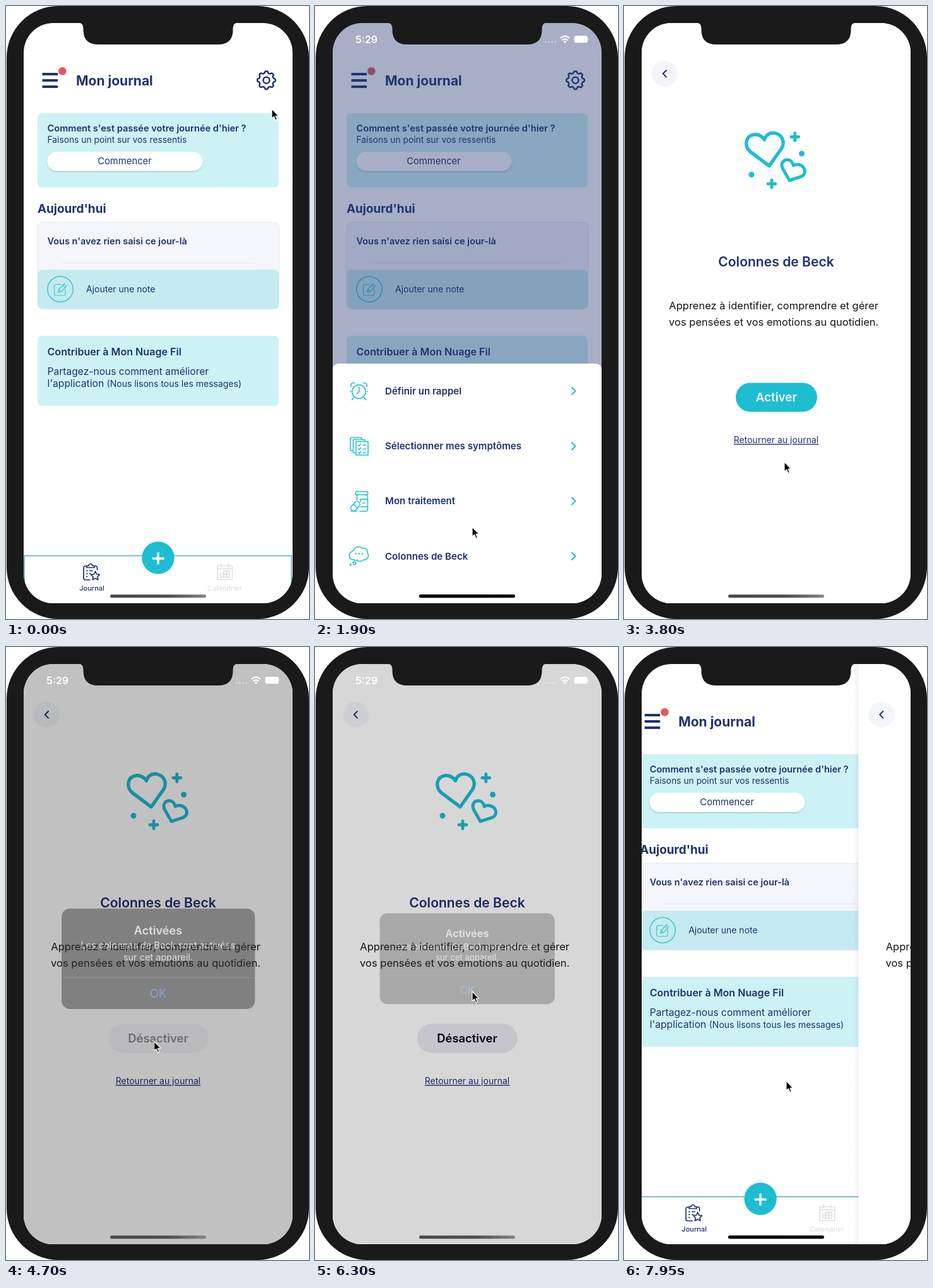
Recreate the animation shown at these times as an HTML page. Size 480 by 972 pixels, loop 8 s.

```html
<!DOCTYPE html>
<html lang="fr">
<head>
<meta charset="utf-8">
<title>Mon journal</title>
<style>
:root {
  --navy: #1f3270;
  --teal: #1fbdd0;
  --ice: #cdf2f5;
  /* critically damped spring over 520 ms */
  --spring: linear(0, .0605 4.17%, .188 8.33%, .334 12.5%, .469 16.67%, .686 25%, .824 33.3%, .905 41.67%, .95 50%, .974 58.3%, .987 66.7%, .9935 75%, .997 83.3%, 1);
}
html, body { margin: 0; width: 100%; height: 100%; overflow: hidden; background: #fff; }
svg { display: block; width: 480px; height: 972px; }
text { font-family: Inter, Roboto, sans-serif; font-optical-sizing: none; fill: var(--navy); }
.b { font-weight: 600; }
.mid { text-anchor: middle; }
.line { fill: none; stroke: var(--navy); stroke-linecap: round; stroke-linejoin: round; }
.cyan { stroke: var(--teal); }

.journal, .modal, .page, .dim, .alert, .black { animation: 8s infinite var(--spring); }
.journal { animation-name: journal; }
.modal { animation-name: modal; }
.page { animation-name: page; }
.dim { animation-name: dim; }
.alert { animation-name: alert; transform-origin: 241px 494.3px; }
.black { animation-name: black; }
.on { animation: on 8s infinite linear; }
.off { animation: off 8s infinite linear; }
.back { animation: back 8s infinite linear; }
.cursor { animation: cursor 8s infinite ease-in-out; }

/* the loop cuts the last slide short, so it runs only the start of the spring */
@keyframes journal {
  0%, 34.825% { transform: none; }
  41.325% { transform: translateX(-128px); }
  97.29% {
    transform: translateX(-128px);
    animation-timing-function: linear(0, .0605 10%, .188 20%, .334 30%, .469 40%, .686 60%, .824 80%, .905);
  }
  100% { transform: translateX(0); }
}
@keyframes page {
  0%, 34.825% { transform: translateX(426px); visibility: hidden; }
  41.325% { transform: translateX(0); visibility: visible; }
  97.29% {
    transform: translateX(0);
    visibility: visible;
    animation-timing-function: linear(0, .0605 10%, .188 20%, .334 30%, .469 40%, .686 60%, .824 80%, .905);
  }
  100% { transform: translateX(426px); visibility: visible; }
}
@keyframes modal {
  0%, 10.625% { transform: translateY(920px); }
  17.125%, 34.825% { transform: none; }
  41.325%, 100% { transform: translateY(920px); }
}
@keyframes dim {
  0%, 57.675% { opacity: 0; }
  64.175%, 77.075% { opacity: .52; }
  83.575%, 100% { opacity: 0; }
}
@keyframes alert {
  0%, 57.675% { opacity: 0; transform: scale(1.2); }
  64.175%, 77.075% { opacity: 1; transform: none; }
  83.575%, 100% { opacity: 0; transform: none; }
}
@keyframes black {
  0%, 10.625% { opacity: 0; }
  17.125%, 41.875% { opacity: 1; }
  48.375%, 96.25% { opacity: 0; }
  98.5%, 100% { opacity: 1; }
}
@keyframes on {
  0%, 55.5% { opacity: 1; }
  55.6%, 57.95% { opacity: .25; }
  58%, 100% { opacity: 0; }
}
@keyframes off {
  0%, 57.95% { opacity: 0; }
  58% { opacity: .28; }
  61.25%, 100% { opacity: 1; }
}
@keyframes back {
  0%, 96.2% { opacity: 1; }
  96.25%, 98% { opacity: .3; }
  100% { opacity: 1; }
}
@keyframes cursor {
  0% { transform: translate(421px, 163px); animation-timing-function: step-end; }
  6.25% { transform: translate(425px, 127px); animation-timing-function: step-end; }
  8.125%, 14% { transform: translate(406px, 120px); }
  21.5%, 24.5% { transform: translate(249px, 826px); }
  29.5%, 42% { transform: translate(226px, 869px); }
  51.8% { transform: translate(272px, 628px); animation-timing-function: linear; }
  52.5%, 61% { transform: translate(234.5px, 625px); }
  67.5%, 79.5% { transform: translate(249px, 546px); }
  89.3% { transform: translate(288px, 687px); }
  91.25%, 100% { transform: translate(257px, 688px); }
}
</style>
</head>
<body>
<svg viewBox="0 0 480 972">
  <defs>
    <clipPath id="screen"><rect x="28" y="27" width="426" height="920" rx="47"/></clipPath>
    <linearGradient id="bar"><stop stop-color="#484848"/><stop offset=".6" stop-color="#4c4c4c"/><stop offset="1" stop-color="#858585"/></linearGradient>
    <linearGradient id="edge"><stop stop-color="#203070" stop-opacity="0"/><stop offset="1" stop-color="#203070" stop-opacity=".07"/></linearGradient>
    <filter id="soft" x="-10%" y="-30%" width="120%" height="170%"><feDropShadow dx="0" dy="1.5" stdDeviation="1.3" flood-color="#355" flood-opacity=".28"/></filter>
    <path id="chevron" class="line cyan" stroke-width="2" d="M407 -5.5L412.5 0L407 5.5"/>
  </defs>

  <rect x="1" width="479" height="972" rx="82" fill="#1a1a1a"/>

  <g clip-path="url(#screen)">
    <rect x="28" y="27" width="426" height="920" fill="#fff"/>

    <g class="journal">
      <path class="line" stroke-width="3.8" style="stroke-linecap:butt" d="M57.5 108H82M57.5 118H82M57.5 128H82"/>
      <circle cx="89.3" cy="103.3" r="6.3" fill="#df5b62"/>
      <text x="111" y="125.5" font-size="21" font-weight="700">Mon journal</text>
      <g transform="translate(412.5 117.7)" class="line" stroke-width="2.5">
        <path id="gear"/><circle r="5"/>
      </g>

      <rect x="50" y="170" width="382" height="117.5" rx="7" fill="var(--ice)"/>
      <text class="b" x="65.5" y="199.2" font-size="14.6">Comment s'est passée votre journée d'hier ?</text>
      <text x="65.5" y="217" font-size="13.8">Faisons un point sur vos ressentis</text>
      <rect x="65.5" y="231" width="246" height="30.5" rx="15.2" fill="#fff" filter="url(#soft)"/>
      <text class="mid" x="188" y="251.3" font-size="14.8">Commencer</text>

      <text x="50" y="327.8" font-size="18.9" font-weight="700">Aujourd'hui</text>
      <rect x="50" y="343" width="382.5" height="137.5" rx="8" fill="#f5f6fb" stroke="#e3e5ee"/>
      <text class="b" x="65.5" y="378" font-size="14.5">Vous n'avez rien saisi ce jour-là</text>
      <path stroke="#e9eaf0" d="M88 407.5H395"/>
      <rect x="50" y="418.3" width="382.5" height="62" rx="8" fill="#c5eaef"/>
      <g class="line cyan" stroke-width="1.2">
        <circle cx="86" cy="449" r="20.2"/>
        <path opacity=".8" d="M87 441.5H79.5Q76.5 441.5 76.5 444.5V456Q76.5 459 79.5 459H91Q94 459 94 456V449M83.5 449.5L92 440.5L95.8 444.3L87.3 453L82.5 454ZM89.8 442.8L93.6 446.6M83.5 449.5L87.3 453"/>
      </g>
      <text x="127" y="454" font-size="14">Ajouter une note</text>

      <rect x="50" y="523" width="382" height="111" rx="7" fill="var(--ice)"/>
      <text class="b" x="65.5" y="554.3" font-size="16.1">Contribuer à Mon Nuage Fil</text>
      <text x="65.5" y="584.6" font-size="15.6">Partagez-nous comment améliorer</text>
      <text x="65.5" y="604.4" font-size="15.7">l'application <tspan font-size="14">(Nous lisons tous les messages)</tspan></text>

      <rect x="29.2" y="871.7" width="423" height="90" fill="#fff" stroke="#45a9bf" stroke-width="1.4"/>
      <circle cx="241" cy="875" r="25.7" fill="var(--teal)"/>
      <path stroke="#fff" stroke-width="3.4" d="M231.5 876H250.5M241 866.5V885.5"/>
      <g class="line" stroke-width="1.7">
        <path d="M133 910H126Q123 910 123 907V891Q123 888 126 888H128M140 888H142Q144.5 888 144.5 891V894M128 890.5V887.5H131Q131.5 884.5 134 884.5T137 887.5H140V890.5ZM127.5 895.5H129M132.5 895.5H137M127.5 900H129M127.5 904.5H129M132.5 900H134"/>
        <path fill="#fff" d="M141.5 896.5L143.6 901L148.4 901.6L144.9 905L145.8 909.8L141.5 907.5L137.2 909.8L138.1 905L134.6 901.6L139.4 901Z"/>
      </g>
      <path class="line" style="stroke:#dfdfe4" stroke-width="1.6" d="M335 887.5H358.5V909.5H335ZM335 892.5H358.5M341 884.5V889.5M352.5 884.5V889.5M339.5 905.5V900.5H344.5V896H354V905.5ZM344.5 900.5V905.5M349.2 896V905.5M344.5 900.5H354"/>
      <g class="mid" font-size="11" font-weight="500">
        <text x="136" y="927.3">Journal</text>
        <text x="346.5" y="927.3" style="fill:#dfdfe4">Calendrier</text>
      </g>
    </g>

    <g class="page">
      <rect x="20" y="27" width="8" height="920" fill="url(#edge)"/>
      <rect x="28" y="27" width="427" height="920" fill="#fff"/>
      <circle cx="64.5" cy="107.3" r="20.5" fill="#f4f5fb"/>
      <path class="line" stroke-width="2" d="M67 102L61.8 107.3L67 112.6"/>
      <g class="line cyan" stroke-width="5.4">
        <path d="M230 253.5L200 231C190 222 192 206 206 203.8C214 203 219 207 222.5 212C224.5 205 230 200.5 238 201.3C250 203 256 215 249.5 226Z"/>
        <path stroke-width="5" d="M262 276.5L251.5 258C248 251 251 245 257 244C263 243 267 247 268.3 253C273 250 280 251 284 255.5C289 262 286 269 279 271Z"/>
        <path stroke-width="4.8" d="M270.8 201.5V213.5M264.8 207.5H276.8M234 276V288M228 282H240"/>
      </g>
      <g fill="var(--teal)"><circle cx="281.5" cy="234" r="4.5"/><circle cx="202" cy="267.5" r="4.5"/></g>
      <text class="b mid" x="241" y="413" font-size="21.1">Colonnes de Beck</text>
      <g class="mid" font-size="16.5" style="--navy:#161616">
        <text x="237.2" y="481">Apprenez à identifier, comprendre et gérer</text>
        <text x="237.2" y="506.6">vos pensées et vos emotions au quotidien.</text>
      </g>
      <g class="on">
        <rect x="177" y="597.5" width="129" height="46" rx="23" fill="var(--teal)"/>
        <text class="b mid" x="241.3" y="627.2" font-size="18.8" style="fill:#fff">Activer</text>
      </g>
      <g class="off">
        <rect x="162" y="597.5" width="158.5" height="46" rx="23" fill="#e9eaf0"/>
        <text class="b mid" x="241" y="627.2" font-size="18.4" style="fill:#000">Désactiver</text>
      </g>
      <text class="mid back" x="241" y="693.3" font-size="14" text-decoration="underline">Retourner au journal</text>
    </g>

    <g class="modal">
      <rect x="28" y="27" width="426" height="920" fill="rgb(37,53,112)" fill-opacity=".4"/>
      <path fill="#fff" d="M28 947V577Q28 567 38 567H444Q454 567 454 577V947Z"/>
      <g class="line cyan" stroke-width="1.5">
        <circle cx="69.5" cy="611.5" r="10.8"/>
        <path d="M70 604.5V612L66 615.5M57 604Q55.5 597 63 597.5M82 604Q83.5 597 76 597.5M61 621L58.5 624.5M78 621L80.5 624.5M55.5 611H56.5M82.5 611H83.5"/>
        <path d="M65 690.5H84V712H65ZM65 708.5H60.5V687.5H79V690.5M60.5 705H56V684.5H74V687.5M68.5 696L70 697.5L72.5 694.5M68.5 702L70 703.5L72.5 700.5M68.5 708L70 709.5L72.5 706.5M76 696.5H80.5M76 702.5H80.5M76 708.5H80.5"/>
        <path d="M64.5 770H83.5V775H64.5ZM66.5 775V783M81.5 775Q83.5 777 83.5 780V798Q83.5 801 80.5 801H71M72 782H83.5M72 794H83.5M72 782V786M75.5 788H79"/>
        <rect x="-8.5" y="-4.5" width="17" height="9" rx="4.5" transform="translate(64 793) rotate(-48)"/>
        <path d="M61 790L67 796M57 801H66"/>
        <path d="M60.5 878C52.5 877 52.5 866 60 864.5C62 857.5 71 855.5 75.5 860C81 859 84 863.5 83 867C86.5 872 83 879.5 77 878C73 881.5 68.5 881 66.5 878.5Q63.5 879.5 60.5 878Z"/>
        <circle cx="62.5" cy="883.5" r="2.3"/><circle cx="56.3" cy="886" r="1"/>
        <path stroke-width="2.4" d="M64.5 868.5H64.6M69.7 868.5H69.8M75 868.5H75.1"/>
      </g>
      <g class="b" font-size="15.1">
        <text x="111" y="615.7">Définir un rappel</text>
        <text x="111" y="703">Sélectionner mes symptômes</text>
        <text x="111" y="790.4">Mon traitement</text>
        <text x="111" y="877.6">Colonnes de Beck</text>
      </g>
      <use href="#chevron" y="610.5"/><use href="#chevron" y="698"/><use href="#chevron" y="785"/><use href="#chevron" y="872.5"/>
    </g>

    <rect class="dim" x="28" y="27" width="426" height="920"/>
    <g class="alert">
      <rect x="102.7" y="422.3" width="277" height="144" rx="12" fill="#363636"/>
      <path stroke="#565656" d="M103 521.5H379.5"/>
      <g class="mid" style="--navy:#fff">
        <text class="b" x="241" y="459.5" font-size="16.4">Activées</text>
        <text x="241" y="480" font-size="13.1">Les colonnes de Beck sont activées</text>
        <text x="241" y="496.5" font-size="13.1">sur cet appareil.</text>
        <text x="241" y="550" font-size="16.8" style="fill:#4584e6">OK</text>
      </g>
    </g>

    <rect x="165" y="933.3" width="152" height="5" rx="2.5" fill="url(#bar)"/>
    <rect class="black" x="165" y="933.3" width="152" height="5" rx="2.5"/>

    <g fill="#fff">
      <text class="b" x="64" y="59" font-size="16" style="fill:#fff">5:29</text>
      <path stroke="#fff" stroke-opacity=".4" stroke-width="3" stroke-linecap="round" stroke-dasharray="0 5" d="M365.5 57H381"/>
      <path fill="none" stroke="#fff" stroke-width="2.3" d="M388.8 51Q396 44.5 403.2 51M391.6 54.3Q396 50.5 400.4 54.3"/>
      <path d="M393.5 56.3Q396 54.3 398.5 56.3L396 59Z"/>
      <rect x="410.5" y="47.2" width="21.5" height="11" rx="3.2"/>
      <path opacity=".6" d="M433.2 51Q435.2 52.7 433.2 54.4Z"/>
    </g>
  </g>

  <path fill="#1a1a1a" d="M114 26Q122.5 27 122.5 35V38Q122.5 61 146 61H336Q359.5 61 359.5 38V35Q359.5 27 368 26Z"/>
  <path class="cursor" stroke="#fff" stroke-width="1.2" stroke-linejoin="round" d="M0 0V15.5L3.5 12.3L6 18L8.4 17L6 11.3H10.8Z"/>
</svg>
<script>
// eight soft teeth around a circle
const points = Array.from({ length: 160 }, (_, i) => {
  const a = i * Math.PI / 80;
  const r = 12.9 + 1.45 * Math.tanh(2 * Math.cos(8 * a));
  return (r * Math.cos(a)).toFixed(2) + ' ' + (r * Math.sin(a)).toFixed(2);
});
document.getElementById('gear').setAttribute('d', 'M' + points.join('L') + 'Z');
</script>
</body>
</html>
```
